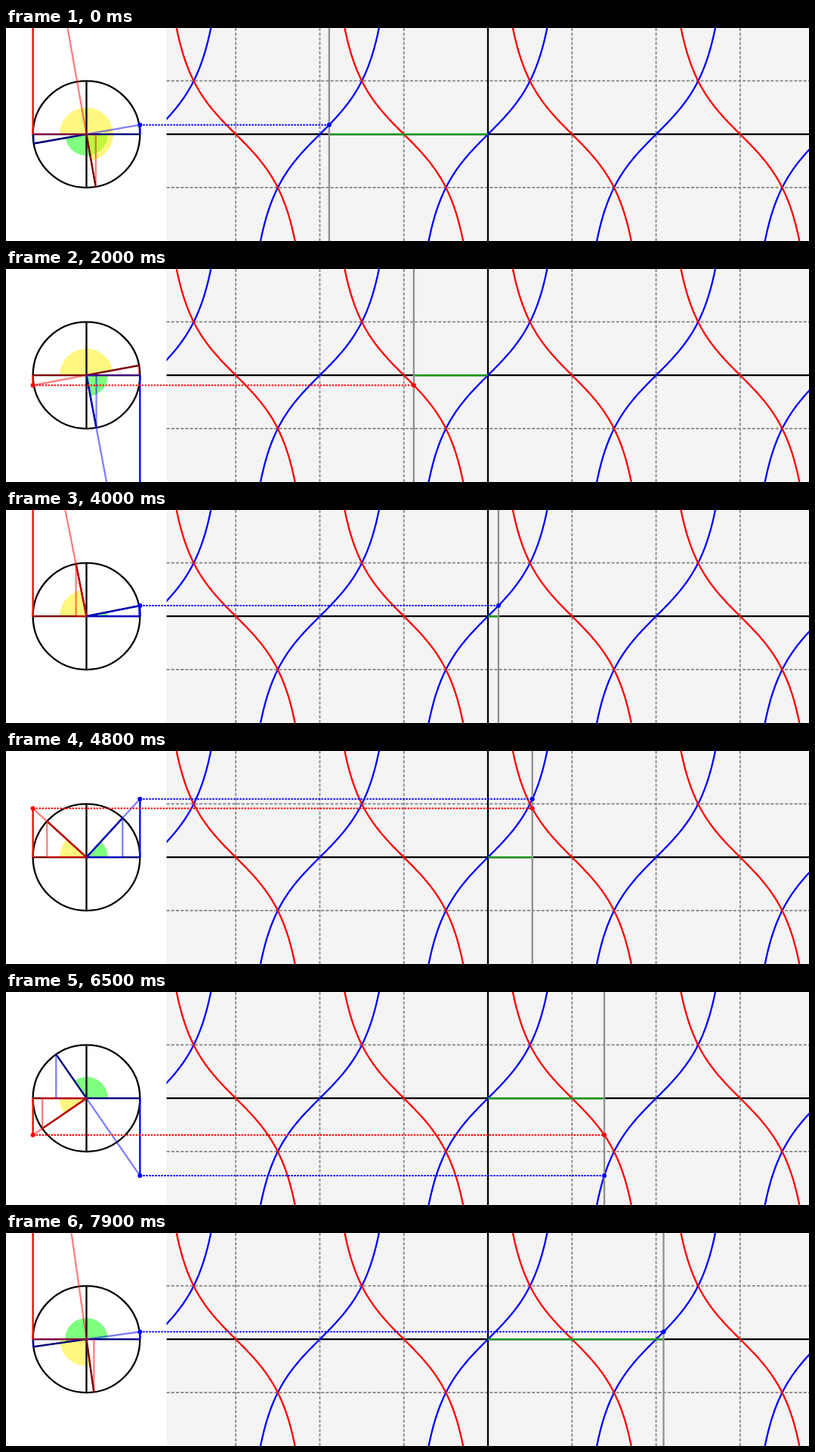
Recreate the animation shown at these times as an HTML page. Size 1063 by 283 pixels, loop 8 s.

```html
<!DOCTYPE html>
<html lang="en">
<head>
<meta charset="utf-8">
<title>Tangent and cotangent</title>
<style>
  html, body { margin: 0; width: 100%; height: 100%; overflow: hidden; background: #fff; }
  svg { display: block; width: 100%; height: 100%; }
</style>
</head>
<body>
<svg id="stage" viewBox="0 0 1063 283" fill="none" stroke-width="2.3">
  <defs><clipPath id="panel"><rect x="212.6" width="851" height="283"/></clipPath></defs>
</svg>
<script>
const R = 70.85, CX = 106.5, CY = 141.2, OX = 638, LEFT = 212.6, W = 1063, H = 283;
const STEP = 100, STEPS = 80, FROM = -170, TO = 188;
const RAD = Math.PI / 180;
const stage = document.getElementById('stage');

function add(tag, attrs) {
  const el = document.createElementNS('http://www.w3.org/2000/svg', tag);
  set(el, attrs);
  stage.appendChild(el);
  return el;
}
function set(el, attrs) {
  for (const key in attrs) el.setAttribute(key, attrs[key]);
}
const path = (stroke, d = '', more = {}) => add('path', { stroke, d, ...more });
const poly = pts => 'M' + pts.map(p => p.map(v => v.toFixed(2)).join(' ')).join('L');
const polar = (deg, r = R) => [CX + r * Math.cos(deg * RAD), CY - r * Math.sin(deg * RAD)];

function sector(start, sweep, r) {
  const [x1, y1] = polar(start, r), [x2, y2] = polar(start + sweep, r);
  const flags = `${+(Math.abs(sweep) > 180)} ${+(sweep < 0)}`;
  return `M${CX} ${CY}L${x1} ${y1}A${r} ${r} 0 ${flags} ${x2} ${y2}Z`;
}

// One branch per half period, centred on its zero crossing.
function curve(zero, sign) {
  let d = '';
  for (let n = -3; n <= 3; n++) {
    const pts = [];
    for (let u = -1.25; u <= 1.2501; u += 0.025)
      pts.push([OX + R * (zero + n * Math.PI + u), CY - sign * R * Math.tan(u)]);
    d += poly(pts);
  }
  return d;
}

// Graph panel
add('rect', { x: LEFT, y: 0, width: W - LEFT, height: H, fill: '#f4f4f4' });
const dashed = { 'stroke-width': 2, 'stroke-dasharray': '4 2.2' };
for (const n of [-3, -2, -1, 1, 2, 3])
  path('#909090', `M${OX + n * R * Math.PI / 2} 0V${H}`, dashed);
for (const s of [-1, 1])
  path('#909090', `M${LEFT} ${CY + s * R}H${W}`, dashed);
path('#000', `M${LEFT} ${CY}H${W}M${OX} 0V${H}`);
const inPanel = { 'clip-path': 'url(#panel)' };
path('#00f', curve(0, 1), inPanel);
path('#f00', curve(Math.PI / 2, -1), inPanel);
const span = path('#1e961e', '', { 'stroke-width': 2.6 });
const cursor = path('#909090');

// Unit circle
const greenArc = add('path', { fill: '#0f0', 'fill-opacity': 0.5 });
const yellowArc = add('path', { fill: '#fff000', 'fill-opacity': 0.5 });
add('circle', { cx: CX, cy: CY, r: R, stroke: '#000' });
path('#000', `M${CX - R} ${CY}H${CX + R}M${CX} ${CY - R}V${CY + R}`);

const parts = [
  { color: '#00f', side: 1, shift: 0 },
  { color: '#f00', side: -1, shift: 90 }
];
const faint = { 'stroke-opacity': 0.5, 'stroke-linejoin': 'round' };
for (const p of parts) p.radius = path('#000');
for (const p of parts) p.inner = path(p.color, '', faint);
for (const p of parts) p.outer = path(p.color, '', faint);
for (const p of parts) {
  p.tangent = path(p.color);
  p.dots = path(p.color, '', { 'stroke-width': 2, 'stroke-dasharray': '2.4 1.6' });
  p.ends = [0, 1].map(() => add('circle', { r: 3, fill: p.color }));
}

function draw(ms) {
  const k = Math.floor(ms / STEP) % STEPS;
  const a = FROM + k * (TO - FROM) / (STEPS - 1);
  const x = OX + R * a * RAD;

  set(span, { d: `M${OX} ${CY}H${x}` });
  set(cursor, { d: `M${x} 0V${H}` });
  set(greenArc, { d: sector(0, a, R * 0.4) });
  set(yellowArc, { d: sector(180, a - 90, R * 0.5) });

  for (const p of parts) {
    const tip = polar(a + p.shift), foot = [tip[0], CY], mid = [CX, CY];
    const edge = CX + p.side * R;
    const tan = Math.tan((a + p.shift) * RAD) * p.side;
    const y = CY - R * tan;
    set(p.radius, { d: poly([mid, tip]) });
    set(p.inner, { d: poly([mid, foot, tip]) + 'Z' });
    set(p.outer, { d: poly([[edge, CY], mid, [edge, y]]) });
    set(p.tangent, { d: poly([[edge, CY], [edge, y]]) });
    set(p.dots, { d: poly([[edge, y], [x, y]]) });
    [edge, x].forEach((cx, i) => set(p.ends[i], { cx, cy: y }));
  }
}

const start = performance.now();
function tick() {
  draw(performance.now() - start);
  requestAnimationFrame(tick);
}
tick();
</script>
</body>
</html>
```
